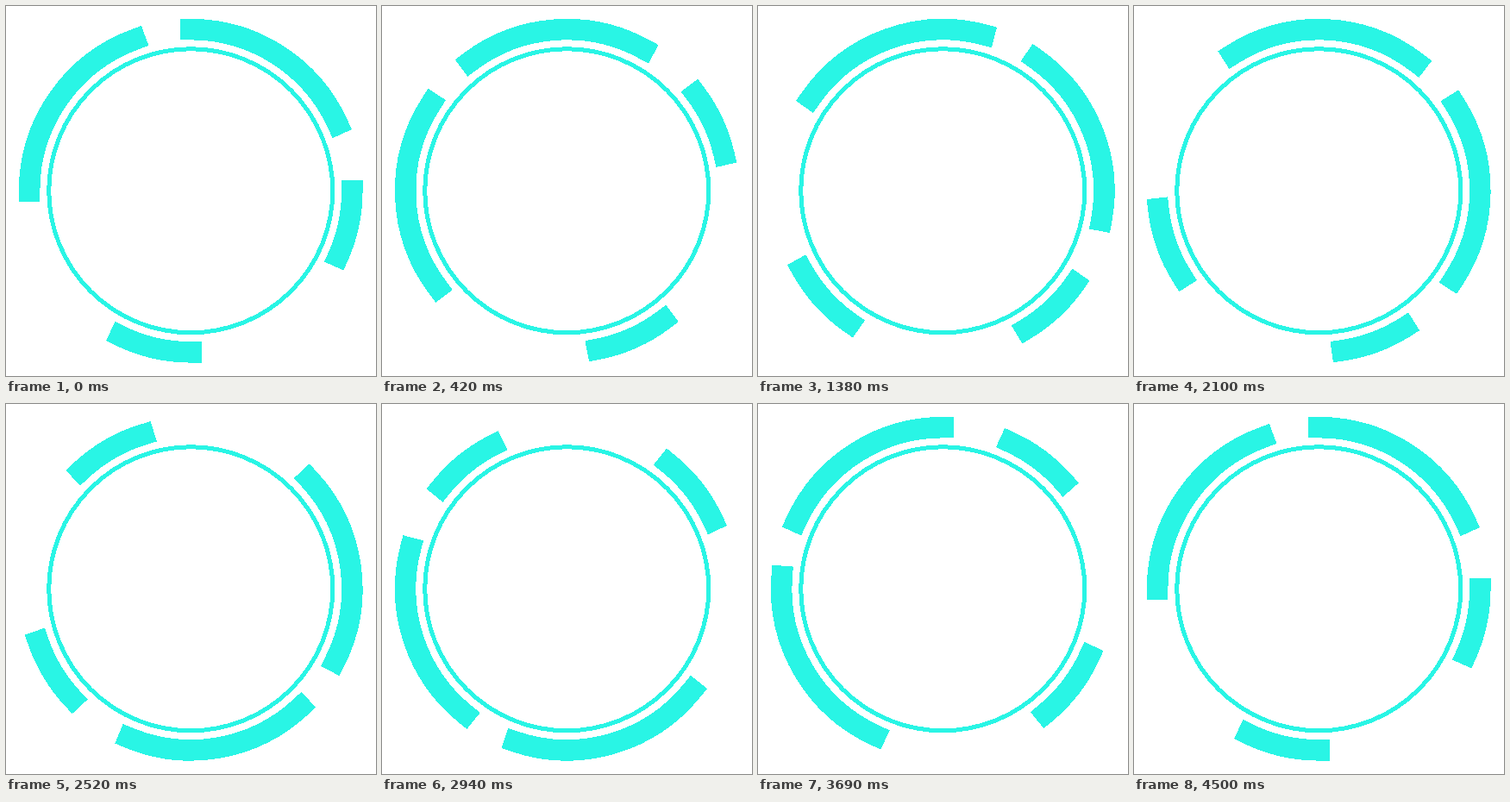
Write an HTML page that moves like this. It is 429 by 429 pixels and loops after 4.53 s.

```html
<!DOCTYPE html>
<html lang="en">
<head>
<meta charset="utf-8">
<title>Rotating ring</title>
<style>
  html, body { margin: 0; height: 100%; overflow: hidden; background: #fff; }
  svg { display: block; width: 100vw; height: 100vh; }
  circle { fill: none; stroke: #29f5e5; stroke-width: 5; shape-rendering: crispEdges; }
  #arcs circle { stroke-width: 24.5; stroke-linecap: square; }
</style>
</head>
<body>
<svg viewBox="-214.25 -214.25 429 429">
  <circle r="164.5"/>
  <g id="arcs"></g>
</svg>
<script>
const LOOP = 4530, STEP = 30;
const arcs = document.getElementById('arcs');

// Four arcs, each starting on a quarter turn; lengths in degrees.
[65.6, 24, 26, 69.8].forEach((length, i) => {
  const arc = document.createElementNS('http://www.w3.org/2000/svg', 'circle');
  arc.setAttribute('r', 187.1);
  arc.setAttribute('pathLength', 360);
  arc.setAttribute('stroke-dasharray', `${length} 360`);
  arc.setAttribute('transform', `rotate(${i * 90 - 90})`);
  arcs.append(arc);
});

// Back a little, forward, rest, then on to a full turn: [ms, degrees].
const keys = [
  [0, 0], [885, -80], [1375, 35], [1845, 35], [2520, 137],
  [3210, 265.4], [3450, 291], [3690, 294.6], [LOOP - STEP, 360]
];

// Mean speed from key i to the next; zero outside the keys.
function slope(i) {
  if (!keys[i] || !keys[i + 1]) return 0;
  return (keys[i + 1][1] - keys[i][1]) / (keys[i + 1][0] - keys[i][0]);
}

// Speed at key i: harmonic mean of both sides, zero at turning points.
function speed(i) {
  const a = slope(i - 1), b = slope(i);
  return a * b > 0 ? 2 * a * b / (a + b) : 0;
}

// Smooth cubic curve through the keys.
function angleAt(t) {
  const i = keys.findIndex(key => t <= key[0]);
  if (i < 1) return 0;
  const [t0, a0] = keys[i - 1], [t1, a1] = keys[i];
  const d = t1 - t0, x = (t - t0) / d, y = 1 - x;
  return a0 + (a1 - a0) * x * x * (3 - 2 * x)
    + d * x * y * (speed(i - 1) * y - speed(i) * x);
}

function draw() {
  const t = Math.floor(performance.now() % LOOP / STEP) * STEP;
  arcs.setAttribute('transform', `rotate(${angleAt(t)})`);
  requestAnimationFrame(draw);
}
draw();
</script>
</body>
</html>
```
